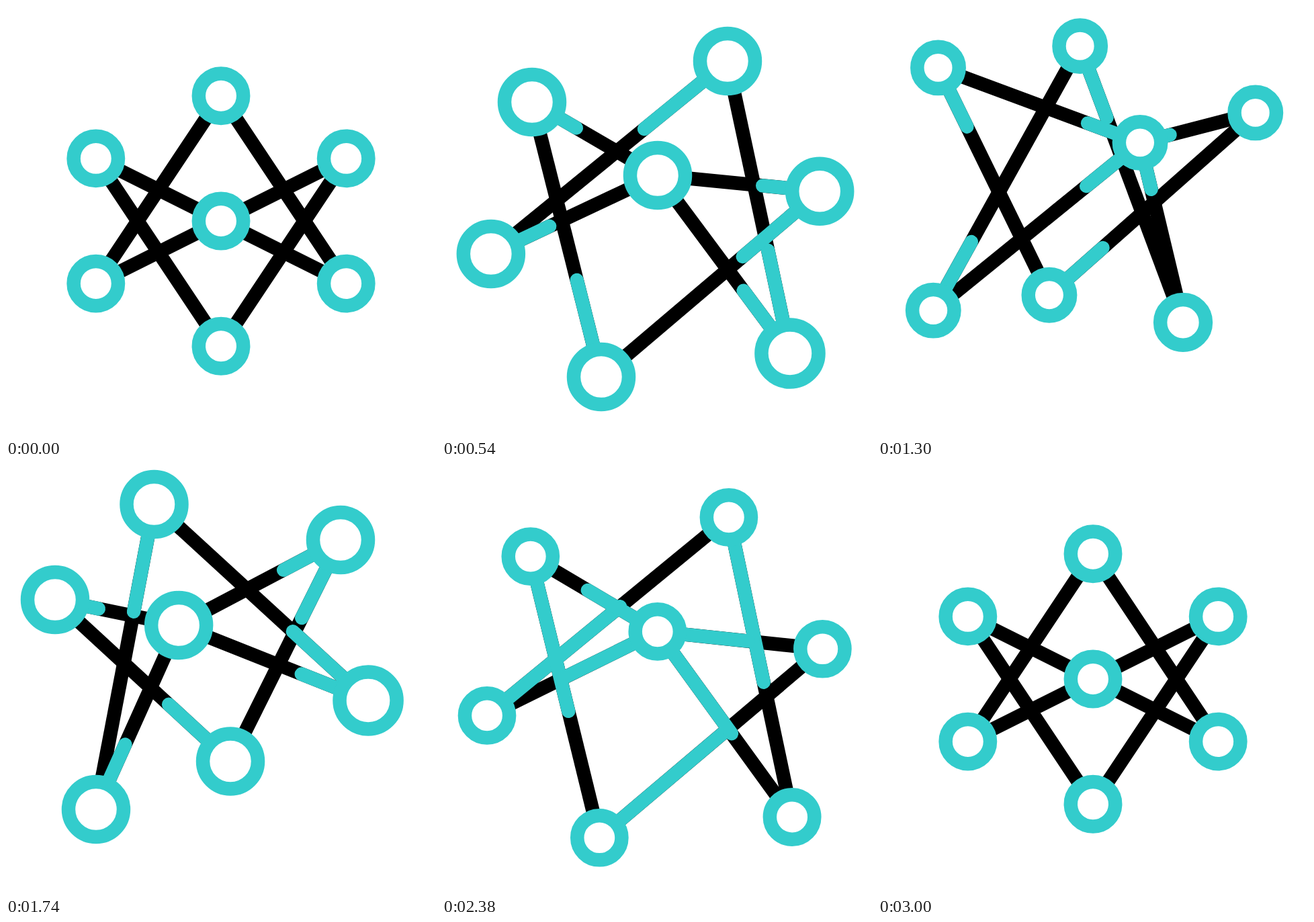
Animation, 640 px wide and 640 px high, one loop 3.2 s. Source, as an HTML page:

```html
<!DOCTYPE html>
<html lang="en">
<head>
<meta charset="utf-8">
<title>Network</title>
<style>
  html, body { margin: 0; width: 100%; height: 100%; overflow: hidden; background: #fff; }
  svg { display: block; width: 100vw; height: 100vh; }
  line, circle { stroke-width: 20.5; }
  .wire { stroke: #000; }
  .pulse { stroke: #3cc; stroke-linecap: round; }
  circle { stroke: #3cc; fill: #fff; }
</style>
</head>
<body>
<svg id="stage" viewBox="0 0 640 640"></svg>
<script>
const LOOP = 3200, ACTIVE = 3000, FRAME = 20;
const stage = document.getElementById('stage');

// Six poses per node, 600 ms apart: x, y, x, y, ...
const paths = {
  top:         [320, 133.8, 428, 80.5, 307.3, 59.6, 218, 60, 427.6, 79.4, 320, 133.8],
  topLeft:     [133.8, 226.9, 134, 140.6, 90.9, 82.8, 72.5, 205.4, 132, 137.4, 133.8, 226.9],
  topRight:    [506.2, 226.9, 563.8, 277.2, 567, 162.7, 496, 111.6, 566.6, 275.8, 506.2, 226.9],
  center:      [320, 320, 321, 250, 401, 200.3, 253, 241.2, 321, 249.4, 320, 320],
  bottomLeft:  [133.8, 413.1, 71.1, 367.8, 78, 448.1, 135.6, 515.9, 66.8, 374, 133.8, 413.1],
  bottomRight: [506.2, 413.1, 518.3, 520, 447, 480.7, 541.7, 348.3, 521, 526, 506.2, 413.1],
  bottom:      [320, 506.2, 234.6, 553.3, 248.4, 429.2, 336.5, 442.9, 234, 556.6, 320, 506.2]
};

// Colour travels from the first node to the second.
const links = [
  ['top', 'bottomLeft'], ['bottomRight', 'top'],
  ['topLeft', 'center'], ['bottom', 'topLeft'],
  ['topRight', 'center'], ['topRight', 'bottom'],
  ['bottomLeft', 'center'], ['bottomRight', 'center']
];

const REST = 33.2, BIG = 42.8, SMALL = 25.5;
const slowRadius = [REST, BIG, REST, BIG, REST, REST];
const fastRadius = [REST, SMALL, BIG, SMALL, REST, SMALL, BIG, SMALL, REST, REST, REST];

const clamp = v => Math.min(1, Math.max(0, v));
const ease = v => v * v * (3 - 2 * v);
const mix = (a, b, k) => a + (b - a) * k;
const ramp = (t, start) => ease(clamp((t - start) / 600));

function keyed(values, step, t) {
  const i = Math.min(Math.floor(t / step), values.length - 2);
  return mix(values[i], values[i + 1], ease(clamp(t / step - i)));
}

function add(tag, className) {
  const el = document.createElementNS('http://www.w3.org/2000/svg', tag);
  if (className) el.setAttribute('class', className);
  return stage.appendChild(el);
}

function set(el, attrs) {
  for (const name in attrs) el.setAttribute(name, attrs[name]);
}

const wires = links.map(() => add('line', 'wire'));
const pulses = links.map(() => add('line', 'pulse'));
const nodes = Object.keys(paths).map(name => ({
  name,
  el: add('circle'),
  xs: paths[name].filter((_, i) => i % 2 === 0),
  ys: paths[name].filter((_, i) => i % 2 === 1)
}));

function span(el, a, b, from, to) {
  set(el, {
    x1: mix(a.x, b.x, from), y1: mix(a.y, b.y, from),
    x2: mix(a.x, b.x, to), y2: mix(a.y, b.y, to)
  });
}

function draw(t) {
  const at = {};
  for (const { name, el, xs, ys } of nodes) {
    const p = at[name] = { x: keyed(xs, 600, t), y: keyed(ys, 600, t) };
    const r = name === 'bottomRight' ? keyed(slowRadius, 600, t) : keyed(fastRadius, 300, t);
    set(el, { cx: p.x, cy: p.y, r });
  }

  const start = t < 1500 ? 300 : 1500;
  const head = ramp(t, start);
  const tail = ramp(t, start + 600);
  links.forEach(([from, to], i) => {
    span(wires[i], at[from], at[to], 0, 1);
    span(pulses[i], at[from], at[to], tail, head);
    pulses[i].style.display = head > tail ? '' : 'none';
  });
}

const origin = performance.now();
function tick() {
  const t = (performance.now() - origin) % LOOP;
  draw(Math.min(ACTIVE, Math.floor(t / FRAME) * FRAME));
  requestAnimationFrame(tick);
}
tick();
</script>
</body>
</html>
```
